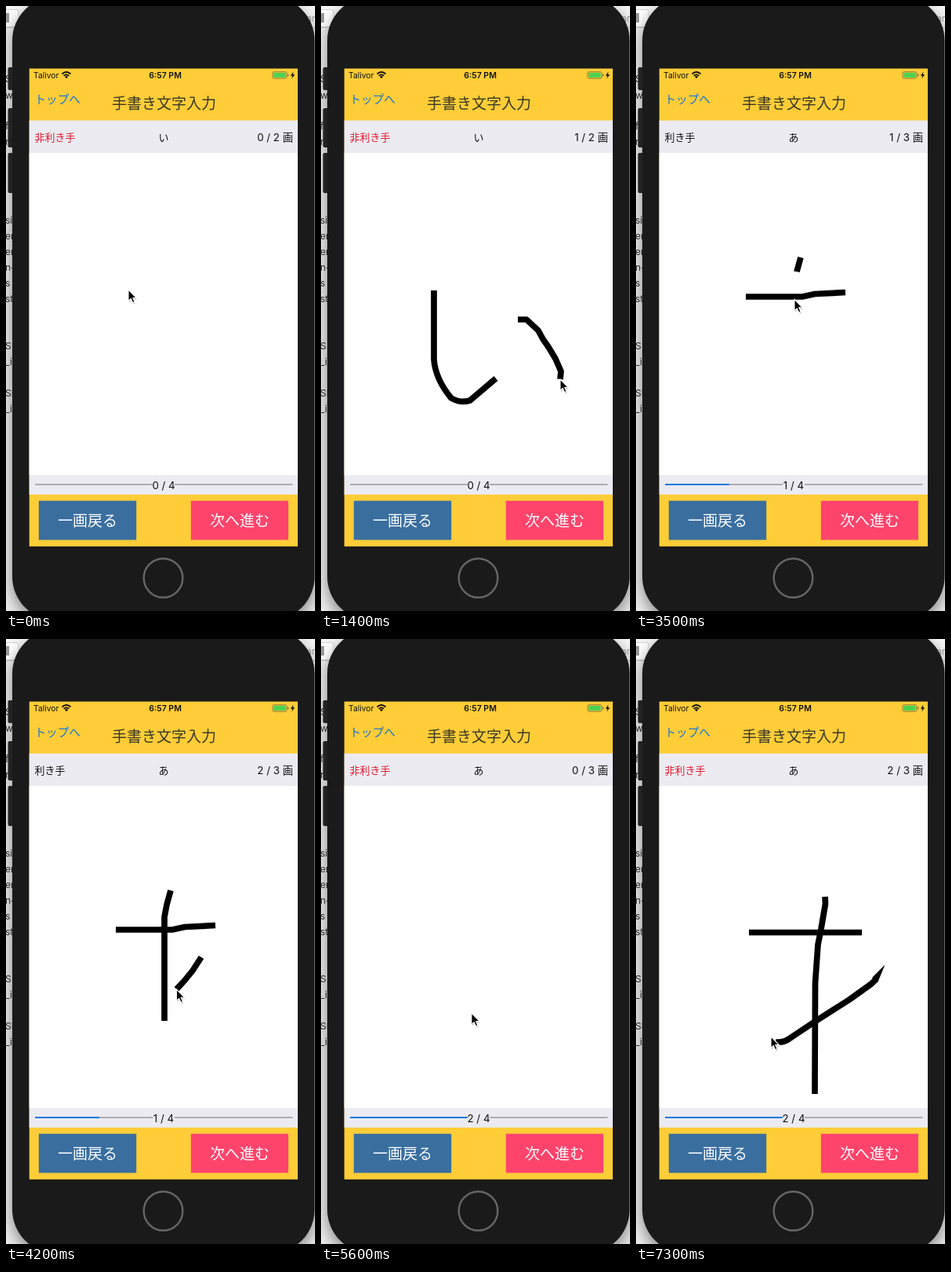
An HTML page for the animation above (7400 ms loop, 394 by 770 pixels).

```html
<!DOCTYPE html>
<html lang="ja">
<head>
<meta charset="utf-8">
<title>手書き文字入力</title>
<style>
  html, body { margin: 0; width: 100%; height: 100%; overflow: hidden; background: #e4e4e4; }
  svg { display: block; width: 394px; height: 770px; }
  text { font-family: Inter, "Noto Sans CJK JP", "Noto Sans CJK", sans-serif; font-size: 13px; fill: #111; }
  .mid { text-anchor: middle; }
  .end { text-anchor: end; }
  .large { font-size: 19px; font-weight: 300; fill: #fff; }
  .number { font-size: 13.3px; }
  #desk text { font-size: 12px; fill: #333; }
  #body { filter: drop-shadow(0 8px 10px rgba(0, 0, 0, .45)); }
  #ink path { fill: none; stroke: #000; stroke-width: 7.7; stroke-linejoin: round; }
</style>
</head>
<body>
<svg viewBox="0 0 394 770">
  <rect width="394" height="770" fill="#efefef"/>
  <rect width="394" height="27" fill="#f6f6f6"/>
  <path d="M0 27.5H394" stroke="#c8c8c8"/>
  <rect x="-4" y="4.500" width="20" height="22" rx="3" fill="#fff" stroke="#d4d4d4"/>
  <rect y="9" width="4" height="12" fill="#999"/>
  <text x="383" y="20" style="font-size:12px;fill:#999">ar</text>
  <g id="desk"></g>

  <g fill="#2b2b2b">
    <rect x="2.500" y="78" width="8" height="29" rx="2"/>
    <rect x="2.500" y="130" width="8" height="50" rx="2"/>
    <rect x="2.500" y="187" width="8" height="51" rx="2"/>
  </g>
  <rect id="body" x="8" y="-12" width="385.500" height="794" rx="56" fill="#1a1a1a"/>
  <circle cx="200.500" cy="728" r="24.800" fill="none" stroke="#666" stroke-width="2.400"/>

  <rect x="29.700" y="79.600" width="342.300" height="608.200" fill="#fecd37"/>
  <rect x="29.700" y="145.700" width="342.300" height="476.100" fill="#ecebf2"/>
  <rect x="29.700" y="187" width="342.300" height="410" fill="#fff"/>

  <text x="35" y="92" style="font-size:10.300px">Talivor</text>
  <g fill="none" stroke="#111" stroke-width="1.800">
    <path d="M71.500 86.500Q77 81.500 82.500 86.500M73.700 88.900Q77 85.900 80.300 88.900"/>
    <path d="M75 89.900Q77 88.300 79 89.900L77 92.200Z" fill="#111" stroke="none"/>
  </g>
  <text class="mid" x="203" y="92" style="font-size:10.500px;font-weight:600">6:57 PM</text>
  <rect x="340" y="83.800" width="18" height="8.400" rx="1.800" fill="none" stroke="#77713f" stroke-width=".9"/>
  <rect x="341.300" y="85" width="15.400" height="6" rx=".8" fill="#4cd250"/>
  <path d="M359.700 86.500V89.500" stroke="#77713f" stroke-width="1.200"/>
  <path d="M366.500 83.500L362.800 88.700H365.200L364.300 92.500L368.200 87.200H365.800Z" fill="#111"/>

  <text x="36.500" y="123.500" style="font-size:14.600px;fill:#1972d8">トップへ</text>
  <text class="mid large" x="201.500" y="131" style="fill:#3b3728">手書き文字入力</text>

  <text id="hand" x="36.500" y="171.500"></text>
  <text id="letter" class="mid" x="201" y="171.500"></text>
  <text id="count" class="end number" x="366" y="171.500"></text>

  <path d="M37 609H365.500" stroke="#adadb0" stroke-width="2"/>
  <path id="progress" stroke="#1c7bd9" stroke-width="2"/>
  <rect x="187" y="600" width="28" height="19" fill="#ecebf2"/>
  <text id="step" class="mid number" x="201" y="614.500"></text>

  <rect x="41.800" y="629.700" width="124.400" height="49.800" fill="#396e9f"/>
  <text class="mid large" x="104" y="662">一画戻る</text>
  <rect x="235.800" y="629.700" width="124.200" height="49.800" fill="#ff446c"/>
  <text id="next" class="mid large" x="298" y="662">次へ進む</text>

  <g id="ink"></g>
  <path id="taper" d="M317.500 414.500L301 431L308 437.500Z"/>

  <g id="cursor">
    <path d="M0 0V14.500L3.300 11.500L5.600 16.700L8 15.600L5.800 10.500H10.300Z" opacity=".2" transform="translate(1 2)"/>
    <path d="M0 0V14.500L3.300 11.500L5.600 16.700L8 15.600L5.800 10.500H10.300Z" stroke="#fff" stroke-width="1.100"/>
  </g>
</svg>

<script>
const LOOP = 7400, TICK = 100;
const $ = id => document.getElementById(id);

function add(parent, tag, attributes) {
  const node = document.createElementNS("http://www.w3.org/2000/svg", tag);
  for (const key in attributes) node.setAttribute(key, attributes[key]);
  return parent.appendChild(node);
}

// Fragments of the window behind the phone
[["S", 97], ["wi", 118], ["f", 157], ["r", 177], ["si", 277], ["en", 297], ["en", 317], ["n-", 337],
 ["s", 357], ["st", 377], ["S'", 437], ["_iC", 457], ["SI", 497], ["_iC", 517]]
  .forEach(([word, y]) => add($("desk"), "text", { x: -1, y }).textContent = word);

const pages = [
  { start: 0, hand: "非利き手", color: "#e3172b", letter: "い", total: 2 },
  { start: 2200, hand: "利き手", color: "#111", letter: "あ", total: 3 },
  { start: 5300, hand: "非利き手", color: "#e3172b", letter: "あ", total: 3 }
];

// lag: how far the ink trails behind the pointer, in ms
const strokes = [
  { page: 0, start: 250, end: 790, d: "M144 362V450Q146 475 166 499Q178 506 190 502L223 474" },
  { page: 0, start: 1020, end: 1400, d: "M251 399H262L277 413L283 424L290 434L299 449L306 465L305 475" },
  { page: 1, start: 2750, end: 3110, d: "M140 370H212L228 366.500L267 364.500" },
  { page: 1, start: 3370, end: 3770, lag: 85, d: "M210 320L205 338L202 354V486" },
  { page: 1, start: 4120, end: 4690, d: "M249 405L238 422Q213 455 174 482Q152 496 129 500V461Q136 446 155 439Q178 431 224 433Q240 438 255 453L273 478" },
  { page: 2, start: 5800, end: 6150, d: "M144 373.500H288" },
  { page: 2, start: 6450, end: 6950, d: "M241 328L241.500 337L236 369L232 389L228.500 438L228 579" },
  { page: 2, start: 7150, end: 7300, lag: 8, d: "M305 434L300 439L272 459L228 487L195 509Q188 514 178 513L172 506" }
];

// Pointer stops outside the strokes: time, x, y
const stops = [
  [0, 156, 361], [1900, 283, 665], [2200, 290, 674], [2400, 290, 674],
  [5000, 280, 665], [5300, 280, 665], [6400, 243, 330]
];

for (const stroke of strokes) {
  stroke.node = add($("ink"), "path", { d: stroke.d });
  stroke.length = stroke.node.getTotalLength();
  stroke.drawnAt = time => {
    const part = (time - stroke.start) / (stroke.end - stroke.start);
    return Math.min(1, Math.max(0, part)) * stroke.length;
  };
  stroke.pointAt = time => {
    const { x, y } = stroke.node.getPointAtLength(stroke.drawnAt(time));
    return [x, y];
  };
  for (const time of [stroke.start, stroke.end]) stops.push([time, ...stroke.pointAt(time)]);
}
stops.sort((a, b) => a[0] - b[0]);

function pointerAt(time) {
  const active = strokes.find(s => time >= s.start && time <= s.end);
  if (active) return active.pointAt(time);
  const next = stops.findIndex(stop => stop[0] > time);
  const [t0, x0, y0] = stops[next - 1], [t1, x1, y1] = stops[next];
  const u = (time - t0) / (t1 - t0), ease = u * u * (3 - 2 * u);
  return [x0 + (x1 - x0) * ease, y0 + (y1 - y0) * ease];
}

function draw(time) {
  const index = pages.findLastIndex(page => time >= page.start);
  const { hand, color, letter, total } = pages[index];
  const done = strokes.filter(s => s.page === index && time > s.end).length;

  $("hand").textContent = hand;
  $("hand").style.fill = color;
  $("letter").textContent = letter;
  $("count").textContent = `${done} / ${total} 画`;
  $("step").textContent = `${index} / 4`;
  $("progress").setAttribute("d", `M37 609h${index * 82}`);

  const pressed = pages.some(page => page.start && Math.abs(time - page.start) <= 100);
  $("next").style.opacity = pressed ? .4 : 1;

  for (const stroke of strokes) {
    const drawn = stroke.drawnAt(time - (stroke.lag || 0));
    stroke.node.style.display = stroke.page === index && drawn > 0 ? "" : "none";
    stroke.node.style.strokeDasharray = `${drawn} ${stroke.length + 1}`;
  }
  $("taper").style.display = time > strokes.at(-1).start ? "" : "none";

  const [x, y] = pointerAt(time);
  $("cursor").setAttribute("transform", `translate(${x} ${y})`);
}

function frame() {
  const time = performance.now() % LOOP;
  draw(Math.floor(time / TICK) * TICK);
  requestAnimationFrame(frame);
}
frame();
</script>
</body>
</html>
```
